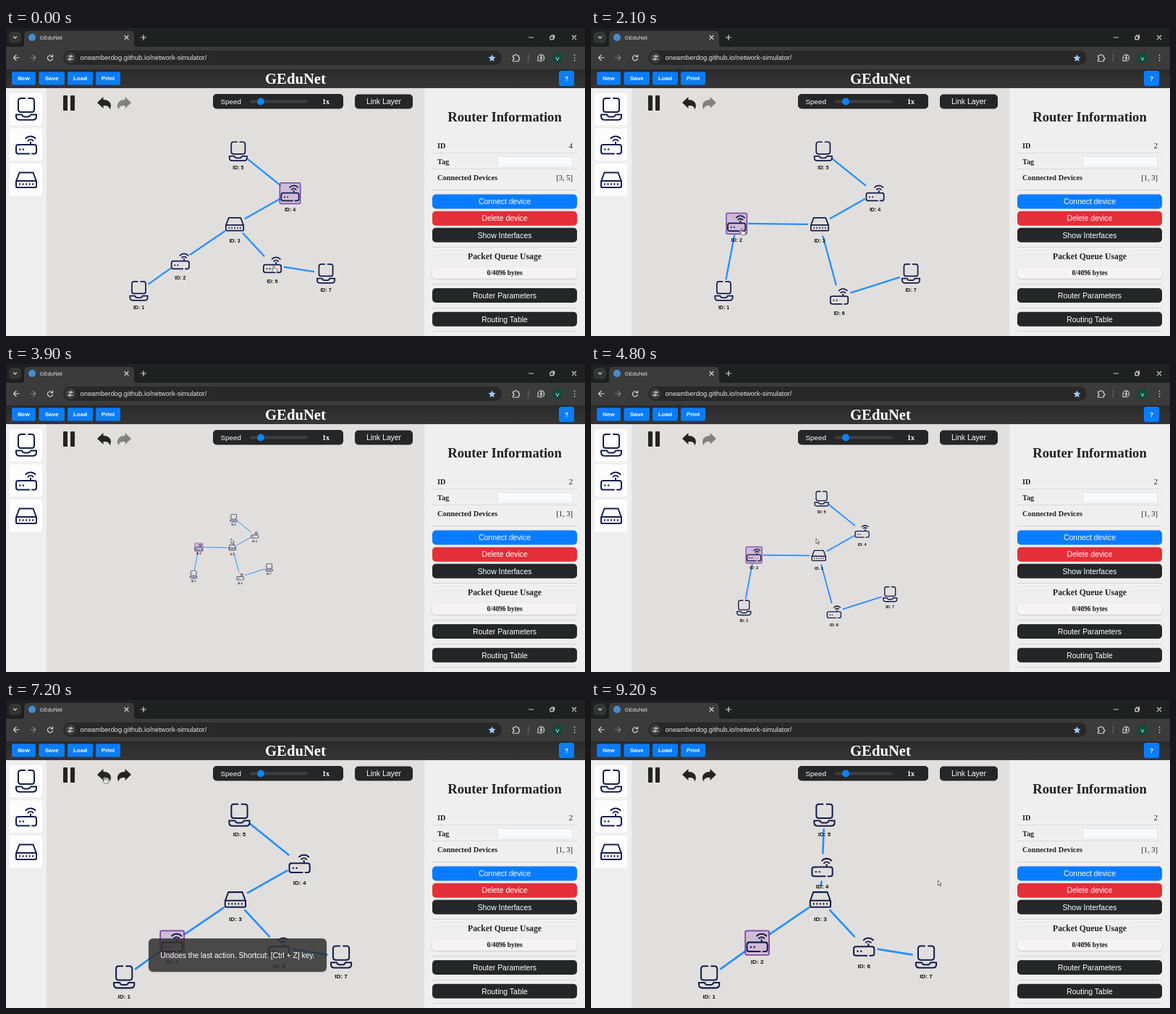
An HTML page that plays this animation: 800x425 px, repeating every 9.3 s.

```html
<!DOCTYPE html>
<html lang="en">
<head>
<meta charset="utf-8">
<title>GEduNet</title>
<style>
html, body { margin: 0; width: 100%; height: 100%; overflow: hidden; background: #e1dfdd; }
svg { display: block; width: 800px; height: 425px; }
text { font-family: "Liberation Sans", Arial, sans-serif; }
.serif { font-family: "Liberation Serif", "Times New Roman", serif; font-weight: bold; fill: #222; }
.mid { text-anchor: middle; }
.end { text-anchor: end; }
.icon { fill: none; stroke: #141c4c; stroke-width: 2; stroke-linecap: round; stroke-linejoin: round; }
.ui { fill: none; stroke: #d4d4d4; stroke-width: 1.2; stroke-linecap: round; stroke-linejoin: round; }
</style>
</head>
<body>
<svg viewBox="0 0 800 425" xmlns="http://www.w3.org/2000/svg">
  <defs>
    <linearGradient id="head" x1="0" y1="0" x2="0" y2="1">
      <stop offset="0" stop-color="#2a2a2a"/><stop offset="1" stop-color="#363636"/>
    </linearGradient>
    <filter id="soft" x="-10%" y="-30%" width="120%" height="180%">
      <feDropShadow dx="0" dy="1" stdDeviation="1.2" flood-opacity=".2"/>
    </filter>
    <clipPath id="area"><rect x="56" y="82" width="522" height="343"/></clipPath>
    <g id="pc" class="icon">
      <path d="M-2-15H-7.500Q-11-15-11-11.500V.5Q-11 4-7.500 4H7.500Q11 4 11 .5V-11.500Q11-15 7.500-15H3"/>
      <path d="M-14 7.500H-6Q-5 10.500-2.500 10.500H2.500Q5 10.500 6 7.500H14V10Q14 14.800 9 14.800H-9Q-14 14.800-14 10Z"/>
    </g>
    <g id="router" class="icon">
      <path d="M6-1V-4M2.500-6A5 5 0 0 1 9.500-6M-.5-9.300A9 9 0 0 1 12.500-9.300"/>
      <path d="M8 12H11Q14 12 14 9V2.500Q14-.5 11-.5H-11Q-14-.5-14 2.500V9Q-14 12-11 12H4"/>
      <path d="M-8.700 6h.1M-4 6h.1" stroke-width="2.400"/>
    </g>
    <g id="switch" class="icon" stroke-width="1.8">
      <path d="M-9.500-10.500H9.500L14 1.500V8.500Q14 10 12.500 10H-12.500Q-14 10-14 8.500V1.500ZM-13.500 1H13.500"/>
      <path d="M-9 5v1M-4.500 5v1M0 5v1M4.500 5v1M9 5v1" stroke-width="1.8"/>
    </g>
    <path id="bend" d="M126 103L134.500 95V99C143 99 147.500 105 143.500 112.500C142.500 108 140 107 134.500 107V111Z"/>
  </defs>

  <rect x="56" y="82" width="522" height="343" fill="#e1dfdd"/>
  <g clip-path="url(#area)"><g id="world"></g></g>
  <g id="page"></g>

  <g fill="#242424">
    <rect x="79" y="93" width="6" height="21" rx="1"/>
    <rect x="89" y="93" width="6" height="21" rx="1"/>
    <use href="#bend"/>
    <use id="redo" href="#bend" transform="translate(299 0) scale(-1 1)"/>
  </g>

  <g id="tip">
    <rect x="197" y="329" width="246" height="46" rx="6" fill="#323232" fill-opacity=".84" filter="url(#soft)"/>
    <text class="mid" x="320" y="356" font-size="10.35" fill="#fff">Undoes the last action. Shortcut: [Ctrl + Z] key.</text>
  </g>

  <g id="chrome">
    <rect width="800" height="27" fill="#1f2020"/>
    <rect y="26" width="800" height="31" fill="#3b3b3b"/>
    <path d="M21 26Q25 26 25 22V10Q25 4 31 4H171Q177 4 177 10V22Q177 26 181 26Z" fill="#3b3b3b"/>
    <rect x="4" y="5" width="17" height="16" rx="5" fill="#343535"/>
    <circle cx="36" cy="13" r="5" fill="#3f8fd0"/>
    <text x="46.500" y="16" font-size="7.6" fill="#e4e4e4">GEduNet</text>
    <rect x="79" y="31" width="606" height="20" rx="10" fill="#282828"/>
    <circle cx="89" cy="41" r="7.500" fill="#3d3d3d"/>
    <text x="102.500" y="44.300" font-size="9.37" fill="#e6e6e6">oneamberdog.github.io/network-simulator/</text>
    <g class="ui">
      <path d="M10.500 12l2 2 2-2M164 10.500l5 5m0-5l-5 5M186.500 13h7M190 9.500v7"/>
      <path d="M18 41h-7.500m3.500-3.500L10.500 41l3.500 3.500"/>
      <path d="M33.500 41H41m-3.500-3.500L41 41l-3.500 3.500" stroke="#858585"/>
      <path d="M64 39.300A3.600 3.600 0 1 0 64.600 42M64.600 37v2.700h-2.700"/>
      <path d="M86 39h2.500M91 39h1.500M85.500 43h1.500M89.500 43h3"/>
      <circle cx="89.700" cy="39" r="1.200"/><circle cx="88.200" cy="43" r="1.200"/>
      <path d="M700.500 38H703a1.500 1.500 0 0 1 3 0h2.300v2.700a1.500 1.500 0 0 1 0 3V46h-7.800v-2.300a1.500 1.500 0 0 0 0-3Z"/>
      <path d="M721.500 36v10" stroke="#646464"/>
      <path d="M736 45.500h3.500A4.300 4.300 0 1 0 735 41V45.500M740.500 38.500l-2.500 3h3l-2.500 2.500"/>
      <path d="M722.500 13h6M782.500 10.500l5 5m0-5l-5 5M753.500 10h4v4.500"/>
      <rect x="752" y="11.500" width="4.300" height="4.300"/>
      <path d="M785.500 37.500h.1M785.500 41h.1M785.500 44.500h.1" stroke-width="1.7"/>
    </g>
    <path d="M671.500 36.500l1.450 3.200 3.500.4-2.600 2.350.75 3.450-3.100-1.750-3.100 1.750.75-3.450-2.600-2.350 3.500-.4Z" fill="#a8c7fa"/>
    <circle cx="762" cy="41.500" r="7" fill="#0c4a3c"/>
    <text class="mid" x="762" y="44.500" font-size="8" fill="#fff">V</text>
  </g>

  <g id="cursor">
    <path id="arrow" d="M0 0V6.800L1.600 5.400 2.700 7.800 3.800 7.300 2.700 5H4.900Z" fill="#fff" stroke="#333" stroke-width=".7"/>
    <text id="help" x="4" y="9.500" font-size="7" font-weight="bold" fill="#222">?</text>
    <path id="hand" d="M0 .6Q.8-.5 1.500.6V3.500L5.500 4.500Q6.300 4.800 6 6L5.300 9H1L-1.800 5.800Q-1.900 4.700-.8 5L0 5.700Z" fill="#fff" stroke="#333" stroke-width=".7"/>
  </g>
</svg>
<script>
const LOOP = 9300, STEP = 100;
const PIVOT = { x: 310.5, y: 241.5 };
const NS = "http://www.w3.org/2000/svg";
const $ = id => document.getElementById(id);

function add(parent, tag, attrs, text) {
  const el = document.createElementNS(NS, tag);
  for (const k in attrs) el.setAttribute(k, attrs[k]);
  if (text !== undefined) el.textContent = text;
  parent.appendChild(el);
  return el;
}

// Static page parts
const page = $("page");
const box = (x, y, w, h, fill, rx = 0, more = {}) =>
  add(page, "rect", { x, y, width: w, height: h, fill, rx, ...more });
const label = (x, y, size, text, cls, more = {}) =>
  add(page, "text", { x, y, "font-size": size, class: cls, ...more }, text);
const button = (x, y, w, h, fill, text, size = 10.45, weight = "normal", rx = 5) => {
  box(x, y, w, h, fill, rx);
  label(x + w / 2, y + h / 2 + size * .36, size, text, "mid", { fill: "#fff", "font-weight": weight });
};
const rule = (y, color = "#d2d2d2") => box(589, y, 200, 1, color);
const BLUE = "#0a7cff", DARK = "#252628";

box(0, 82, 56, 343, "#efefef");
box(578, 82, 222, 343, "#efefef");
box(0, 57, 800, 26, "url(#head)");
button(8, 60.5, 33, 18, BLUE, "New", 8, "bold", 2);
button(45.5, 60.5, 35.5, 18, BLUE, "Save", 8, "bold", 2);
button(85, 60.5, 35, 18, BLUE, "Load", 8, "bold", 2);
button(124, 60.5, 34, 18, BLUE, "Print", 8, "bold", 2);
button(764, 59, 21, 21, BLUE, "?", 8.5, "bold", 3);
label(400, 77, 20.7, "GEduNet", "serif mid", { style: "fill:#fff" });

["pc", "router", "switch"].forEach((kind, i) => {
  box(5, 90 + i * 48.5, 45, 44.5, "#fdfdfd", 3);
  add(page, "use", { href: "#" + kind, x: 28, y: [112, 161.5, 210][i] });
});

box(286, 91, 180, 20.5, DARK, 5);
label(296.5, 104.7, 9.8, "Speed", "", { fill: "#fff" });
box(337, 99.5, 80, 4, "#3d3e41", 2);
box(347, 96.5, 10, 10, "#0a84ff", 5);
label(442, 104.7, 10, "1x", "serif mid", { style: "fill:#fff" });
button(482, 91.5, 80, 20, DARK, "Link Layer");

label(689, 129, 18.65, "Router Information", "serif mid");
label(596, 165.7, 10.35, "ID", "serif");
label(596, 188, 10.35, "Tag", "serif");
label(596, 210, 10.35, "Connected Devices", "serif");
const plain = { style: "font-weight:normal" };
const idText = label(783, 165.7, 10.5, "", "serif end", plain);
const linkText = label(783, 210, 10.5, "", "serif end", plain);
rule(172, "#dcdcdc");
rule(194, "#dcdcdc");
box(679, 177, 104, 15, "#f8f9fa", 2, { stroke: "#d9dbde", "stroke-width": .8 });
[223, 302, 353, 386, 418].forEach(y => rule(y));
button(589, 229.5, 200, 20, BLUE, "Connect device");
button(589, 252.7, 200, 20, "#e22f38", "Delete device");
button(589, 275.8, 200, 20, DARK, "Show Interfaces");
label(689, 319, 11.7, "Packet Queue Usage", "serif mid");
box(589, 330, 200, 15.5, "#f5f3f3", 5, { filter: "url(#soft)" });
label(689, 340.7, 9.35, "0/4096 bytes", "serif mid", { style: "fill:#111" });
button(589, 359, 200, 20, DARK, "Router Parameters");
button(589, 391.8, 200, 20, DARK, "Routing Table");

// Network
const LINKS = [[1, 2], [2, 3], [3, 4], [4, 5], [3, 6], [6, 7]];
const HOME = {
  1: [183.5, 363], 2: [240.8, 322], 3: [316, 271], 4: [392.5, 228],
  5: [320.8, 170.3], 6: [368, 327], 7: [442, 339]
};
const KIND = { 1: "pc", 2: "router", 3: "switch", 4: "router", 5: "pc", 6: "router", 7: "pc" };
const MOVED = { 2: [201.2, 269.7], 4: [318.3, 232.5], 6: [343, 370.5] };

const world = $("world");
const lines = LINKS.map(() => add(world, "line", { stroke: "#2490fb", "stroke-width": 2.3 }));
const nodes = {};
for (const id in HOME) {
  const g = add(world, "g", {});
  const mark = add(g, "rect", {
    x: -14.2, y: -14.2, width: 28.4, height: 28.8, rx: 2,
    fill: "#9650be", "fill-opacity": .25, stroke: "#7a45a8", "stroke-width": 1.5
  });
  add(g, "use", { href: "#" + KIND[id], transform: "scale(.87)" });
  add(g, "text", { class: "mid", y: 25.2, "font-size": 7, "font-weight": "bold", fill: "#111" }, "ID: " + id);
  nodes[id] = { g, mark };
}

// Motion
const clamp = (v, a, b) => Math.min(b, Math.max(a, v));
const part = (t, a, b) => clamp((t - a) / (b - a), 0, 1);
const ease = u => u * u * (3 - 2 * u);
const mix = (a, b, u) => a + (b - a) * u;
const mix2 = (p, q, u) => [mix(p[0], q[0], u), mix(p[1], q[1], u)];

const PATH = [
  [0, 369, 328], [200, 369, 328], [800, 344, 371], [900, 344, 371],
  [1300, 247, 329], [1500, 247, 329], [2100, 207.4, 276.7], [2200, 207.4, 276.7],
  [2500, 311, 241], [5300, 311, 241], [5800, 140.5, 107.5], [6000, 140.5, 107.5],
  [6300, 135.5, 106], [8000, 135.5, 106], [8700, 479.5, 249], [LOOP, 479.5, 249]
];

function cursorAt(t) {
  let i = 1;
  while (i < PATH.length - 1 && PATH[i][0] < t) i++;
  const [a, x, y] = PATH[i - 1], [b, x2, y2] = PATH[i];
  return mix2([x, y], [x2, y2], ease(part(t, a, b)));
}

function scaleAt(t) {
  const low = Math.log(.404), high = Math.log(1.16);
  return Math.exp(t < 4050 ? low * part(t, 2560, 3900) : mix(low, high, part(t, 4050, 5250)));
}

function placesAt(t) {
  const p = { ...HOME };
  if (t < 6900) p[6] = mix2(HOME[6], MOVED[6], ease(part(t, 200, 800)));
  if (t < 6400) p[2] = mix2(HOME[2], MOVED[2], ease(part(t, 1500, 2100)));
  if (t >= 7500) p[4] = MOVED[4];
  return p;
}

const show = (el, on) => el.setAttribute("visibility", on ? "visible" : "hidden");

function draw(t) {
  const p = placesAt(t);
  const picked = t < 200 ? 4 : t < 1500 ? 6 : 2;
  world.setAttribute("transform",
    `translate(${PIVOT.x} ${PIVOT.y}) scale(${scaleAt(t)}) translate(${-PIVOT.x} ${-PIVOT.y})`);

  LINKS.forEach(([a, b], i) => {
    const [x1, y1] = p[a], [x2, y2] = p[b];
    const d = Math.hypot(x2 - x1, y2 - y1);
    const ux = (x2 - x1) / d * 16, uy = (y2 - y1) / d * 16;
    const ends = { x1: x1 + ux, y1: y1 + uy, x2: x2 - ux, y2: y2 - uy };
    for (const k in ends) lines[i].setAttribute(k, ends[k]);
  });
  for (const id in nodes) {
    nodes[id].g.setAttribute("transform", `translate(${p[id]})`);
    show(nodes[id].mark, +id === picked);
  }

  idText.textContent = picked;
  linkText.textContent = { 4: "[3, 5]", 6: "[3, 7]", 2: "[1, 3]" }[picked];
  $("redo").setAttribute("fill", t < 6400 ? "#828282" : "#242424");
  $("tip").setAttribute("opacity", part(t, 6000, 6300) * (1 - part(t, 8100, 8400)));

  const hand = t <= 900 || (t >= 1200 && t < 2200) || (t > 6000 && t < 8200);
  $("cursor").setAttribute("transform", `translate(${cursorAt(t)})`);
  show($("hand"), hand);
  show($("arrow"), !hand);
  show($("help"), t >= 5700 && t <= 6000);
}

const start = performance.now();
function tick(now) {
  const t = Math.max(0, now - start) % LOOP;
  draw(Math.floor(t / STEP) * STEP);
  requestAnimationFrame(tick);
}
draw(0);
requestAnimationFrame(tick);
</script>
</body>
</html>
```
